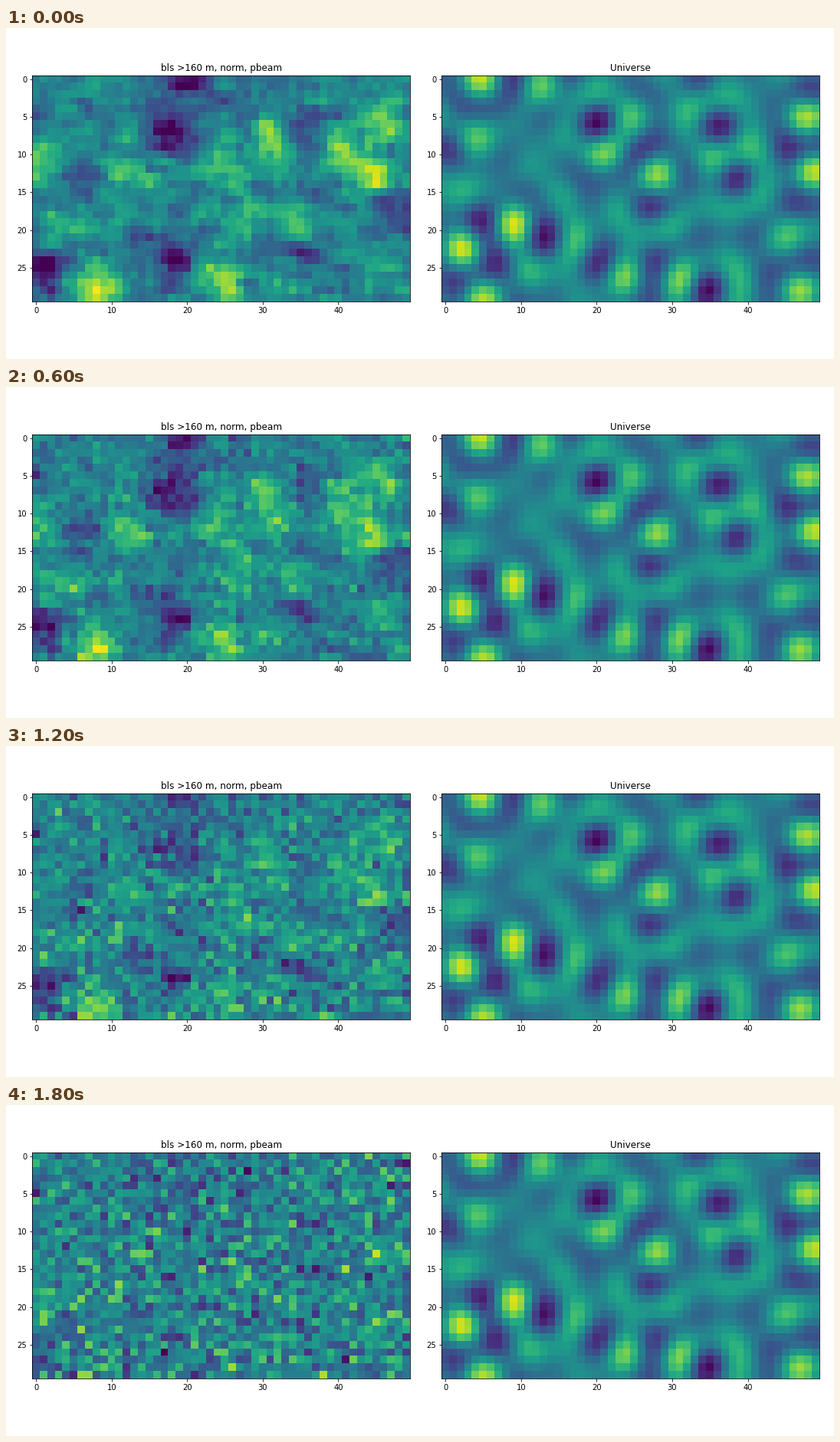
A matplotlib script that plays this animation: 1080 by 432 pixels, repeating every 2000 ms.

```python
import matplotlib.pyplot as plt
import numpy as np
from matplotlib.animation import FuncAnimation

WIDTH, HEIGHT, DPI = 1080, 432, 72
COLS, ROWS, CELL = 50, 30, 9.856
FRAMES, INTERVAL = 10, 200
MEAN = 0.45
GX, GY = np.meshgrid(np.arange(COLS), np.arange(ROWS))

# Key extremes of each map as (column, row), strongest first
UNIVERSE_PEAKS = [(9, 19.4), (2.3, 22.8), (4.5, 0), (48.8, 12), (5, 29),
                  (48, 5.5), (47, 28), (28, 12.4), (31, 26.5), (24, 26),
                  (21.5, 9.5), (13, 1), (4.5, 8), (24.6, 5.5), (45, 21.3),
                  (35.5, 10.5), (18, 21), (11, 25)]
UNIVERSE_VOIDS = [(20, 6), (34.5, 28), (13.5, 21), (36, 6.3), (5, 18.8),
                  (38.5, 13.3), (20, 24.5), (27, 17), (0, 9), (9, 0.5),
                  (48.5, 1), (33.5, 0), (48.5, 24)]
OBSERVED_PEAKS = [(44, 13), (7.5, 28), (31, 8), (40, 9), (24.5, 27.5),
                  (46.5, 6), (24.5, 11.5), (11.5, 12.3), (0, 11), (34, 18),
                  (26, 20)]
OBSERVED_VOIDS = [(18, 7.5), (18.5, 23.5), (1.5, 25), (36, 6), (19, 1),
                  (6.5, 14.5), (47, 16.3), (35, 24)]


def blob(dx, dy):
    return np.exp(-(dx ** 2 + dy ** 2) / 8)


def ripple(dx, dy):
    """Plane waves averaged over all directions, fading with distance."""
    angles = np.arange(12) * np.pi / 12
    waves = sum(np.cos(0.86 * (dx * np.cos(a) + dy * np.sin(a)))
                for a in angles)
    return waves / len(angles) * np.exp(-(dx ** 2 + dy ** 2) / 90)


def landscape(peaks, voids, kernel):
    """Smooth field through the peaks and voids, near MEAN elsewhere."""
    px, py = np.array(peaks + voids).T
    level = np.concatenate([np.linspace(0.97, 0.66, len(peaks)),
                            np.linspace(0.0, 0.24, len(voids))])

    def influence(x, y):
        return kernel(x[..., None] - px, y[..., None] - py)

    system = influence(px, py) + 0.04 * np.eye(len(px))
    return MEAN + influence(GX, GY) @ np.linalg.solve(system, level - MEAN)


def smooth(noise):
    """Blur with wraparound, wider across than down, to unit variance."""
    rows = noise + 0.8 * np.roll(noise, 1, 0)
    blurred = sum(np.roll(rows, k, 1) for k in range(3))
    return blurred / blurred.std()


def observed(i):
    """The signal sinks into noise that grows finer and stronger."""
    t = i / (FRAMES - 1)
    fresh = np.random.default_rng(100 + i).standard_normal((ROWS, COLS))
    grain = 0.85 * lasting + 0.53 * fresh
    signal = (1 - 0.9 * t ** 1.5) * (steady - MEAN)
    noise = (0.02 + 0.13 * t) * grain + 0.08 * (1 - t) * smooth(grain)
    return np.clip(MEAN + signal + noise, 0, 1)


lasting = np.random.default_rng(7).standard_normal((ROWS, COLS))
steady = landscape(OBSERVED_PEAKS, OBSERVED_VOIDS, blob)
universe = landscape(UNIVERSE_PEAKS, UNIVERSE_VOIDS, ripple)
maps = [observed(i) for i in range(FRAMES)]

plt.rcParams["font.family"] = "DejaVu Sans"
fig = plt.figure(figsize=(WIDTH / DPI, HEIGHT / DPI), dpi=DPI, facecolor="white")


def panel(left, title, data):
    ax = fig.add_axes([left / WIDTH, 74.62 / HEIGHT,
                       COLS * CELL / WIDTH, ROWS * CELL / HEIGHT])
    image = ax.imshow(data, cmap="viridis", vmin=0, vmax=1, aspect="auto",
                      interpolation="nearest")
    ax.set_title(title, fontsize=12)
    ax.set_xticks(range(0, COLS, 10))
    ax.set_yticks(range(0, ROWS, 5))
    ax.tick_params(labelsize=10)
    return image


view = panel(34.2, "bls >160 m, norm, pbeam", maps[0])
panel(568.4, "Universe", universe)


def update(i):
    view.set_data(maps[i])
    return [view]


anim = FuncAnimation(fig, update, frames=FRAMES, interval=INTERVAL,
                     init_func=lambda: update(0), repeat=True, repeat_delay=0)
plt.show()
```
